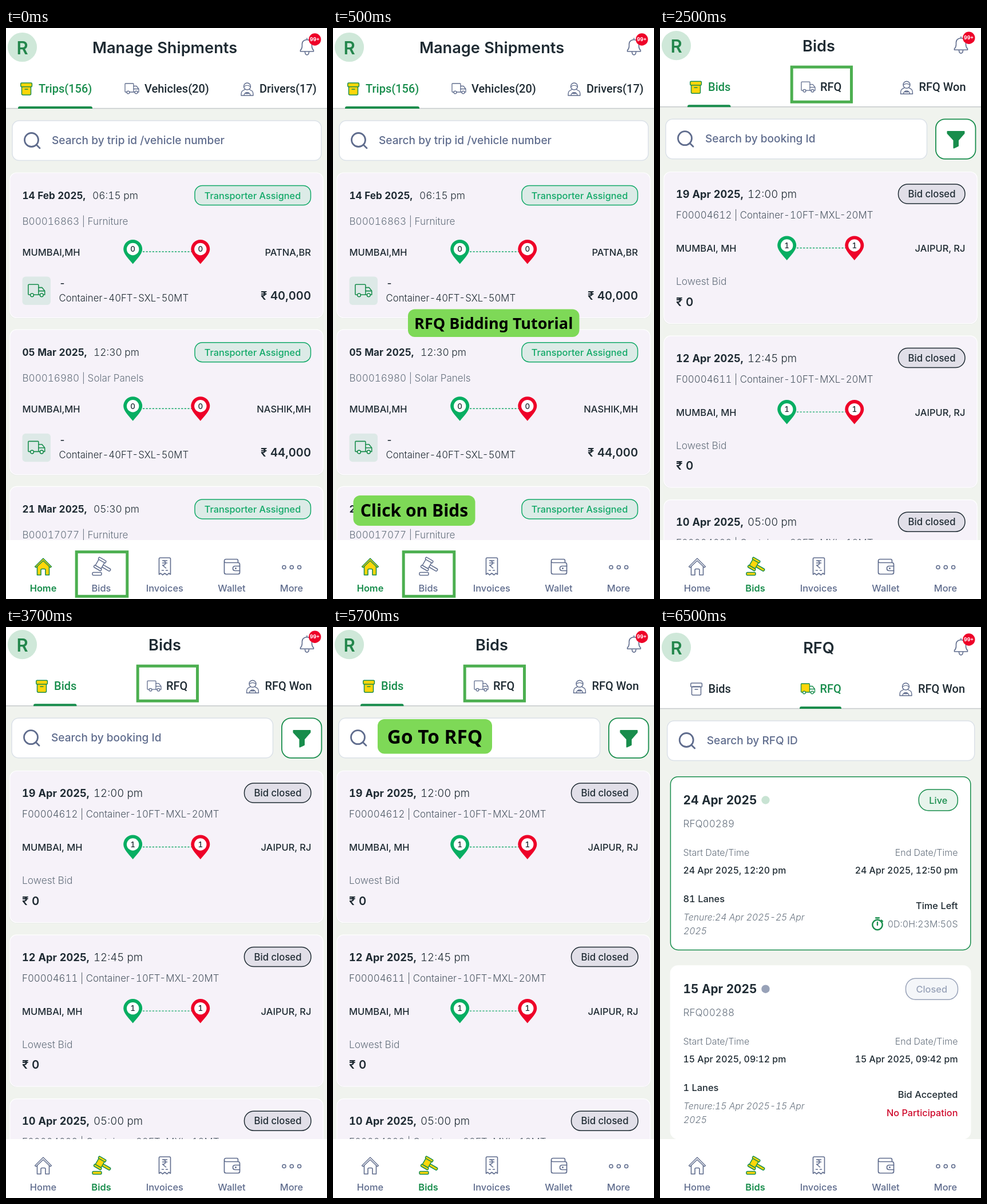
An HTML page for the animation above (8000 ms loop, 561x998 px).

```html
<!DOCTYPE html>
<html lang="en">
<head>
<meta charset="utf-8">
<title>Shipments tutorial</title>
<style>
html, body { margin: 0; width: 100%; height: 100%; overflow: hidden; background: #f0f3ee; }
svg { display: block; width: 100vw; height: 100vh; font-family: Inter, "Noto Sans", sans-serif; font-variant-numeric: tabular-nums; }
text { white-space: pre; }
</style>
</head>
<body>
<svg id="stage" viewBox="0 0 561 998"></svg>
<script>
const GREEN = '#188d4c', MINT = '#12a968', DARK = '#1f2b33', SLATE = '#5f6c8d',
      GREY = '#66717e', YELLOW = '#ffd60a', MARK = '#4caf50', MUTED = '#98a2b8';

// Drawing helpers: each returns SVG markup
const text = (x, y, s, size, fill = DARK, weight = 400, anchor = 'start', extra = '') =>
  `<text x="${x}" y="${y}" font-size="${size}" fill="${fill}" font-weight="${weight}" text-anchor="${anchor}" ${extra}>${s}</text>`;
const rect = (x, y, w, h, r, fill, stroke = 'none', sw = 1.5) =>
  `<rect x="${x}" y="${y}" width="${w}" height="${h}" rx="${r}" fill="${fill}" stroke="${stroke}" stroke-width="${sw}"/>`;
const circle = (x, y, r, fill, stroke = 'none', sw = 1.5) =>
  `<circle cx="${x}" cy="${y}" r="${r}" fill="${fill}" stroke="${stroke}" stroke-width="${sw}"/>`;
const path = (d, stroke, sw = 1.5, fill = 'none') =>
  `<path d="${d}" stroke="${stroke}" stroke-width="${sw}" fill="${fill}" stroke-linejoin="round" stroke-linecap="round"/>`;
const at = (x, y, s, scale = 1) => `<g transform="translate(${x} ${y}) scale(${scale})">${s}</g>`;

// Icons, drawn from their top left corner
const truck = (c, fill = 'none') =>
  rect(1, 1, 15, 15, 1, fill, c, 1.3) + path('M16 5.5H21L25 10.5V16H16M16 10.5H25', c, 1.3) +
  circle(6.5, 16.5, 2.4, '#f4f6f8', c, 1.3) + circle(20.5, 16.5, 2.4, '#f4f6f8', c, 1.3);
const archive = (c, fill = 'none') =>
  rect(2.5, 6, 16, 15, 2, fill, c) + rect(.8, 0, 19.6, 6.8, 1.5, fill, c) + path('M8 11H13', c);
const driver = () =>
  circle(11.5, 6, 6, 'none', SLATE, 1.4) + path('M6 6.5C9 3.5 14 3.5 17 6.5', SLATE, 1.2) +
  path('M7.5 11.5L3 14Q1 15.5 1 22H22Q22 15.5 20 14L15.5 11.5M6 22C6 15 17 15 17 22M9 18.5H14', SLATE, 1.4);
const house = on =>
  path('M5.5 14V31H12V22.5Q12 20.5 14 20.5H18Q20 20.5 20 22.5V31H26.5V14L16 4Z', on ? GREEN : SLATE, 1.6, on ? YELLOW : 'none') +
  path('M1.5 16.5L16 2L30.5 16.5L28.5 18L16 6L3.5 18Z', on ? GREEN : SLATE, 1.4, on ? YELLOW : '#fff');
const gavel = on => {
  const c = on ? GREEN : SLATE, f = on ? YELLOW : '#fff';
  return `<g transform="rotate(30 15 12)">${rect(19, 9.8, 16, 4.4, 2.2, f, c) + rect(8, 4, 11.5, 15, 1, f, c) +
    rect(6.5, 1.5, 14.5, 4, 1.5, f, c) + rect(6.5, 17.5, 14.5, 4, 1.5, f, c)}</g>` + rect(1, 25.5, 16, 5, 2, f, c);
};
const invoice = () =>
  path('M1 3Q1 1 3 1H19Q21 1 21 3V30L18 28L15 31L11 28L7 31L4 28L1 30Z', SLATE, 1.6) +
  path('M7 6H15M7 10H15M7 6C14 6 14 14 7 14L13 19M6 23H9M13 23H16', SLATE, 1.6);
const wallet = () =>
  path('M4 1H23Q25 1 25 4V7H4Q1 7 1 4Q1 1 4 1ZM1 4V24Q1 27 4 27H25Q28 27 28 24V10Q28 7 25 7', SLATE, 1.7) +
  path('M28 13H20Q16 13 16 17Q16 21 20 21H28', SLATE, 1.7) + circle(21, 17, 1.4, SLATE);
const bell = () =>
  path('M-11.5 41V39Q-8.5 36 -8.5 32V28C-8.5 18 8.5 18 8.5 28V32Q8.5 36 11.5 39V41ZM-3.5 42C-3 48.5 3 48.5 3.5 42M0 20V18', SLATE, 1.6);

const pin = (x, y, fill, n) => at(x, y,
  path('M0 26C-7 17 -16.5 9 -16.5 0A16.5 16.5 0 0 1 16.5 0C16.5 9 7 17 0 26Z', 'none', 0, fill) +
  circle(0, 0, 10.7, '#fff') + text(0, 4.8, n, 13.5, DARK, 500, 'middle'));
const route = (y, n) =>
  `<path d="M239 ${y + 4.5}H324" stroke="${MINT}" stroke-width="1.4" stroke-dasharray="3.2 2.4"/>` +
  pin(221.7, y, '#07ae62', n) + pin(339.8, y, '#ee0128', n);

// Screen header; tabs are [x of icon, icon, x of label, label, active]
function header(dy, title, tabs, line, search) {
  const [sx, sw, hint] = search;
  return at(0, dy,
    rect(0, -5, 561, 145.5, 0, '#fff') + rect(0, 139.8, 561, 1.5, 0, '#c6cacc') +
    circle(28.5, 33.5, 25.6, '#cfe8d9') + text(28.5, 45.5, 'R', 31, '#23864c', 600, 'middle') +
    text(277.5, 43.5, title, 27.2, DARK, 600, 'middle') +
    at(526, 0, bell()) + circle(539.8, 20, 10.7, '#ee0128') + text(539.5, 23.2, '99+', 8.8, '#fff', 700, 'middle') +
    tabs.map(([ix, icon, x, s, on]) => at(ix, 96, icon) +
      text(x, 113, s, 20, on ? GREEN : DARK, 500, 'start', 'font-family="Roboto, sans-serif"')).join('') +
    path(`M${line[0]} 141V140Q${line[0]} 137 ${line[0] + 3} 137H${line[1] - 3}Q${line[1]} 137 ${line[1]} 140V141Z`, 'none', 0, GREEN) +
    rect(sx, 162, sw, 69.5, 12, '#fff', '#dbe1e8') +
    circle(sx + 33.5, 195.5, 12, 'none', SLATE, 2.8) + path(`M${sx + 42.5} 204.5l5.5 5.5`, SLATE, 2.8) +
    text(sx + 69, 203.3, hint, 19.1, SLATE, 500));
}

function nav(active) {
  const label = (x, s) => text(x, 985, s, 16.4, s === active ? GREEN : SLATE, s === active ? 600 : 500, 'middle');
  return rect(0, 895, 561, 103, 0, '#fff') +
    at(49, 925, house(active === 'Home')) + at(150, 926, gavel(active === 'Bids')) +
    at(266.5, 925, invoice()) + at(380.5, 927.5, wallet()) +
    [486, 499.3, 512.6].map(x => circle(x, 942.5, 3, 'none', SLATE, 1.6)).join('') +
    label(65, 'Home') + label(166.5, 'Bids') + label(277.3, 'Invoices') + label(394.5, 'Wallet') + label(499, 'More');
}

const card = (y, h) => rect(6, y + 1, 549, h, 12, '#e4e5e8') + rect(6.8, y, 547.5, h, 12, '#f6f2f9', '#fff', 1.2);

const trip = ([date, time, ref, to, price], i) => at(0, 274.2 * i,
  card(253, 253.5) + text(28.5, 299, date, 17.1, DARK, 700) + text(i ? 153 : 151, 299, time, 17.4, DARK, 300) +
  rect(330, 275.5, 202.5, 34, 13, '#dcebe7', MINT) + text(431, 298.8, 'Transporter Assigned', 16.3, MINT, 500, 'middle') +
  text(28.5, 344, ref, 17.1, GREY, 300) +
  text(28.5, 397.5, 'MUMBAI,MH', 16.5, DARK, 500) + route(386.5, 0) + text(533, 397.5, to, 16.5, DARK, 500, 'end') +
  rect(28.5, 434.5, 49.5, 49.5, 6, '#dde9e7') + at(37.7, 447, truck(GREEN), 1.2) +
  text(93, 452, '-', 17, DARK, 500) + text(92.5, 477.5, 'Container-40FT-SXL-50MT', 16.8, DARK, 300) +
  text(533, 475, price, 20.3, DARK, 600, 'end'));

const bid = ([date, time, ref], i) => at(0, 286.6 * i,
  card(251.5, 265) + text(28, 297, date, 18.2, DARK, 700) + text(153, 297, time, 18.7, DARK, 300) +
  rect(416.5, 273, 116.5, 34, 16.5, '#e1dfe8', DARK) + text(475, 296, 'Bid closed', 16.7, DARK, 500, 'middle') +
  text(28, 333, ref, 16.9, '#4d5864', 300) +
  text(28, 391, 'MUMBAI, MH', 16.5, DARK, 500) + route(380, 1) + text(533.5, 391, 'JAIPUR, RJ', 16.5, DARK, 500, 'end') +
  text(28, 449, 'Lowest Bid', 17.4, GREY, 300) + text(28, 485.5, '₹ 0', 20.6, DARK, 600));

const rfq = ([day, id, start, end, lanes, tenure, live], i) => at(0, 330.2 * i,
  rect(18.4, 261.7, 524.4, 302.7, 13, '#fff', live ? GREEN : '#fff') +
  text(40.5, 310, day, 20.8, DARK, 700) + circle(184.5, 302.5, 7.2, live ? '#c8e3d3' : MUTED) +
  (live ? rect(452.3, 284, 68, 37, 17, '#e7f4ec', GREEN) + text(486.3, 308.5, 'Live', 16.3, GREEN, 500, 'middle')
        : rect(429.5, 284, 91, 37, 17, '#f4f6f9', MUTED) + text(474.7, 308.5, 'Closed', 16.4, MUTED, 500, 'middle')) +
  text(40.5, 350, id, 17.2, GREY, 300) +
  text(40.5, 399.5, 'Start Date/Time', 16, GREY, 300) + text(520.5, 399.5, 'End Date/Time', 16, GREY, 300, 'end') +
  text(40.5, 430.5, start, 15.9, DARK, 500) + text(520.5, 430.5, end, 15.9, DARK, 500, 'end') +
  text(40.5, 481, lanes, 16.4, DARK, 500) +
  text(41, 512.5, tenure, 15.8, GREY, 300, 'start', 'font-style="italic"') +
  text(41, 537, '2025', 15.8, GREY, 300, 'start', 'font-style="italic"') +
  text(520.5, 493, live ? 'Time Left' : 'Bid Accepted', 16.4, DARK, 500, 'end') +
  (live ? circle(380, 520.5, 8.7, '#fff', GREEN, 2.5) + path('M377 508.5H383M380 516V521M387 512.5L389 514.5', GREEN, 2.3) +
          text(520.5, 525, '0D:0H:23M:50S', 16, GREY, 300, 'end')
        : text(520.5, 524.5, 'No Participation', 16.3, '#cf0a2c', 500, 'end')));

const callout = (x, y, w, h, s, size, base) => rect(x, y, w, h, 12, '#7ed957') +
  text(x + w / 2, base, s, size, '#000', 700, 'middle', 'font-family="Noto Sans, Open Sans, sans-serif"');

const homeScreen = [
  ['14 Feb 2025,', '06:15 pm', 'B00016863 | Furniture', 'PATNA,BR', '₹ 40,000'],
  ['05 Mar 2025,', '12:30 pm', 'B00016980 | Solar Panels', 'NASHIK,MH', '₹ 44,000'],
  ['21 Mar 2025,', '05:30 pm', 'B00017077 | Furniture', '', '']
].map(trip).join('') +
  header(0, 'Manage Shipments', [
    [25, archive(GREEN, YELLOW), 57, 'Trips(156)', true],
    [207, truck(SLATE), 242, 'Vehicles(20)'],
    [410, driver(), 443, 'Drivers(17)']
  ], [21, 151], [11, 540, 'Search by trip id /vehicle number']);

const bidScreen = [
  ['19 Apr 2025,', '12:00 pm', 'F00004612 | Container-10FT-MXL-20MT'],
  ['12 Apr 2025,', '12:45 pm', 'F00004611 | Container-10FT-MXL-20MT'],
  ['10 Apr 2025,', '05:00 pm', 'F00004609 | Container-32FT-MXL-18MT']
].map(bid).join('') +
  header(-2.8, 'Bids', [
    [52, archive(GREEN, YELLOW), 84, 'Bids', true],
    [246, truck(SLATE), 280, 'RFQ'],
    [419.5, driver(), 452.5, 'RFQ Won']
  ], [48, 123.5], [10, 456.5, 'Search by booking Id']) +
  rect(482, 159.3, 69.5, 69.5, 16, '#fff', GREEN, 1.8) +
  path('M502.5 181H531.5V184L521 196V206L513.5 209.5V196L502.5 184Z', GREEN, 2, GREEN);

const rfqScreen = [
  ['24 Apr 2025', 'RFQ00289', '24 Apr 2025, 12:20 pm', '24 Apr 2025, 12:50 pm', '81 Lanes', 'Tenure:24 Apr 2025-25 Apr', true],
  ['15 Apr 2025', 'RFQ00288', '15 Apr 2025, 09:12 pm', '15 Apr 2025, 09:42 pm', '1 Lanes', 'Tenure:15 Apr 2025-15 Apr', false]
].map(rfq).join('') +
  header(2, 'RFQ', [
    [53, archive(SLATE), 84.5, 'Bids'],
    [245.5, truck(GREEN, YELLOW), 279.5, 'RFQ', true],
    [418, driver(), 451, 'RFQ Won']
  ], [244, 317], [12.7, 537, 'Search by RFQ ID']);

// Each layer is visible from its start to its end, in ms
const layers = [
  [0, 2500, homeScreen + nav('Home') + rect(123.2, 915.7, 88.6, 77.6, 0, 'none', MARK, 5)],
  [500, 2500, callout(131, 491.5, 299.5, 48.5, 'RFQ Bidding Tutorial', 27, 526) +
              callout(35.5, 817, 213, 53, 'Click on Bids', 30, 854)],
  [2500, 6500, bidScreen + nav('Bids') + rect(230.2, 68.2, 104.3, 61, 0, 'none', MARK, 5)],
  [4500, 6500, callout(78, 161, 200, 60.5, 'Go To RFQ', 33.3, 204)],
  [6500, 8000, rfqScreen + nav('Bids')]
];

const stage = document.getElementById('stage');
stage.innerHTML = layers.map(l => `<g>${l[2]}</g>`).join('');

function draw() {
  const t = performance.now() % 8000;
  layers.forEach(([from, to], i) => {
    stage.children[i].style.display = t >= from && t < to ? '' : 'none';
  });
  requestAnimationFrame(draw);
}
draw();
</script>
</body>
</html>
```
